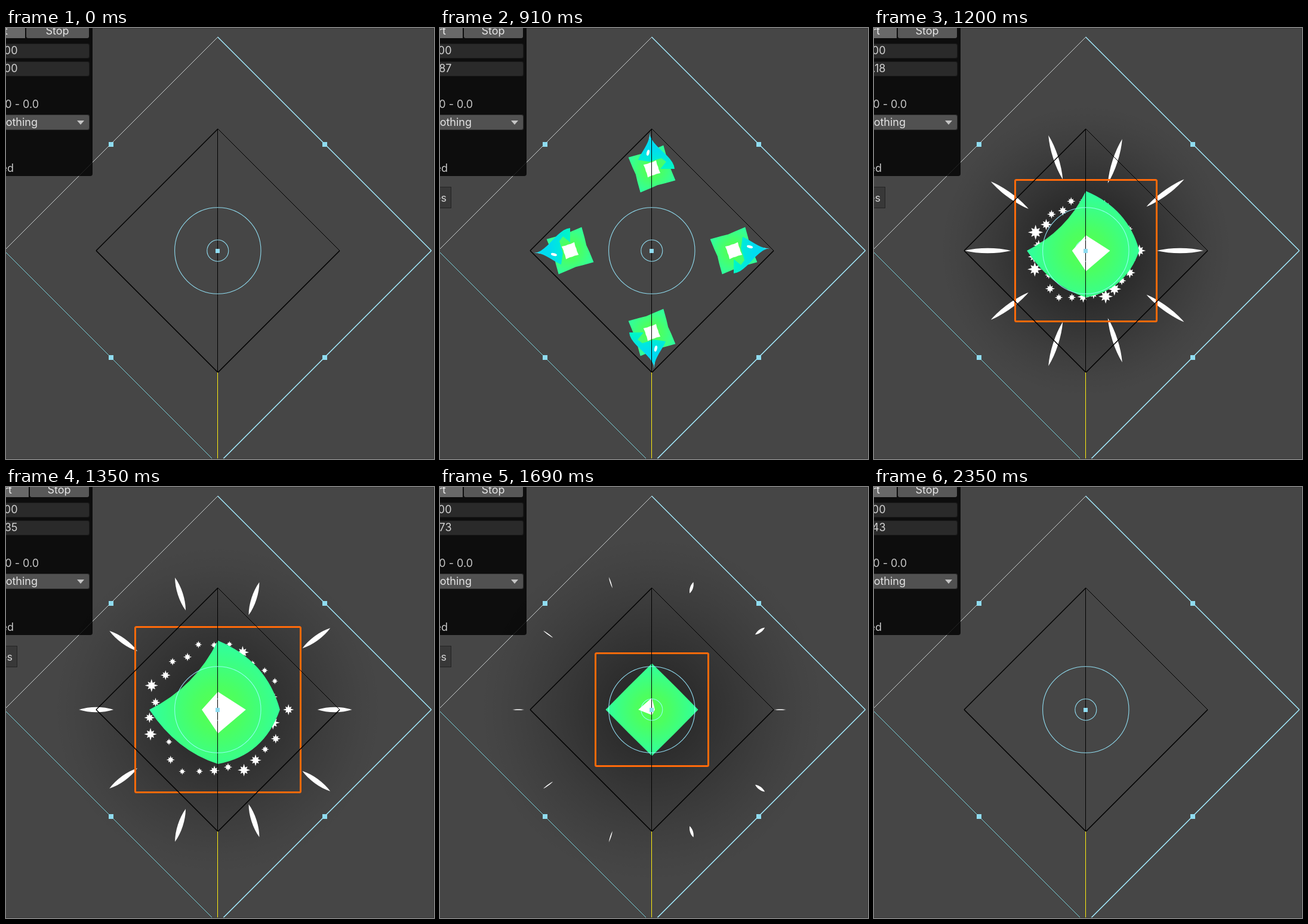
An HTML page with a canvas for the animation above (2.38 s loop, 717 by 722 pixels).

```html
<!DOCTYPE html>
<html lang="en">
<head>
<meta charset="utf-8">
<title>Particle burst</title>
<style>
html, body { margin: 0; width: 100%; height: 100%; overflow: hidden; background: #464646; }
canvas { display: block; }
</style>
</head>
<body>
<canvas id="stage" width="717" height="722"></canvas>
<script>
const ctx = document.getElementById('stage').getContext('2d');
const W = 717, H = 722, LOOP = 2380, CX = 355, CY = 373, TAU = Math.PI * 2;
const CYAN = '#8fdcf0';
const clamp = (v, a = 0, b = 1) => Math.min(b, Math.max(a, v));
const lerp = (a, b, k) => a + (b - a) * k;
const progress = (t, from, to) => clamp((t - from) / (to - from));
const random = seed => { const v = Math.sin(seed * 12.9898) * 43758.5453; return v - Math.floor(v); };
const times = (n, make) => Array.from({ length: n }, (_, i) => make(i));
const polar = (angle, r) => [Math.cos(angle) * r, Math.sin(angle) * r];

function track(keys, t) {
  const next = keys.findIndex(([time]) => t <= time);
  if (next === 0) return keys[0][1];
  if (next < 0) return keys[keys.length - 1][1];
  const [t0, v0] = keys[next - 1], [t1, v1] = keys[next];
  return lerp(v0, v1, progress(t, t0, t1));
}

function poly(points, fill) {
  ctx.beginPath();
  points.forEach(([x, y]) => ctx.lineTo(x, y));
  ctx.fillStyle = fill;
  ctx.fill();
}

function line(x1, y1, x2, y2, color, width = 1) {
  ctx.strokeStyle = color;
  ctx.lineWidth = width;
  ctx.beginPath();
  ctx.moveTo(x1, y1);
  ctx.lineTo(x2, y2);
  ctx.stroke();
}

function rect(x, y, w, h, fill, radius = 0) {
  ctx.fillStyle = fill;
  ctx.beginPath();
  ctx.roundRect(x, y, w, h, radius);
  ctx.fill();
}

function ellipse(x, y, rx, ry, angle, fill) {
  ctx.fillStyle = fill;
  ctx.beginPath();
  ctx.ellipse(x, y, rx, ry, angle, 0, TAU);
  ctx.fill();
}

function radial(radius, stops) {
  const g = ctx.createRadialGradient(0, 0, 0, 0, 0, radius);
  stops.forEach(([stop, color]) => g.addColorStop(stop, color));
  return g;
}

const green = radius => radial(radius, [[0, '#5aff4a'], [.35, '#4bff62'], [1, '#2effa2']]);

function at(x, y, angle, draw) {
  ctx.save();
  ctx.translate(x, y);
  ctx.rotate(angle);
  draw();
  ctx.restore();
}

const around = (n, draw) => times(n, i => at(CX, CY, i * TAU / n, () => draw(i)));

// Four heads fall to the centre; each tail ends where its head was a moment ago.
const headDistance = t => 204 * (1 - progress(t, 570, 1085) ** 2.7);

function square(turn, radius, quarter, middle) {
  const profile = [1.07, quarter, middle, quarter];
  return times(16, i => polar(turn + i * TAU / 16, profile[i % 4] * radius));
}

function drawTail(d, length) {
  const w = clamp(length / 60), y = s => -d - s * length, place = ([x, s]) => [x * w, y(s)];
  const taper = s => Math.cos(s * Math.PI / 2) ** 2;
  const left = times(10, i => lerp(.25, 1, i / 9)).map(s => [-26 * taper(s) - 4 * s, s]);
  const right = times(12, i => 1 - i / 11).map(s => [38 * taper(s) - 4 * s, s]);
  const notch = [[14, 0], [24, .2], [16, .3], [-4, .2]];
  const g = ctx.createLinearGradient(0, y(0), 0, y(.55));
  g.addColorStop(0, '#00f8c4');
  g.addColorStop(1, '#00dcf0');
  poly([...left, ...right, ...notch].map(place), g);

  const mark = length * .085;
  ellipse(-6.5, y(.45), 1 + mark * .25, mark, .25, '#fff');
  poly([[-2.5, y(1)], [-4, y(.86)], [-8, y(.69)], [-5, y(.82)]].map(([x, v]) => [x * w, v]), '#fff');
}

function drawHeads(t) {
  if (t < 75 || t > 1300) return;
  const d = headDistance(t), length = headDistance(t - 195) - d;
  const r = 41 * (1 - (1 - progress(t, 70, 910)) ** 2);
  const k = progress(t, 550, 910), turn = lerp(.4, .455, k);
  const alive = t < 1110;
  if (alive) around(4, () => at(0, -d, 0, () =>
    poly(square(turn, r, lerp(.88, .79, k), lerp(.83, .7, k)), green(r * 1.05))));
  if (length > 3) around(4, () => drawTail(d, length));
  if (t > 1000) around(4, () => ellipse(29, -32, 2.5, 5, -.35, '#fff'));
  if (alive) around(4, () => at(0, -d, 0, () =>
    poly(square(turn, r * lerp(.27, .36, k), .77, .74), '#fff')));
}

// Central blob: four tips joined by curves, calming into an even diamond.
const halfSize = t => t < 1030 ? 0 : 140 - .000523 * (t - 1399) ** 2;

function drawBlob(t) {
  const h = halfSize(t), k = progress(t, 1350, 1690);
  if (t < 1110 || h < 2) return;
  const mix = (wide, calm) => h * lerp(wide / 139, calm / 96, k);
  const tips = [104, 91, 115, 116].map(v => mix(v, 78));
  const sides = [109, 98, 54, 116].map(v => mix(v, 56));
  const core = [mix(47, 5), mix(40, 9), mix(27, 23), mix(30, 20)];
  at(CX, CY, 0, () => {
    ctx.fillStyle = green(h * .84);
    ctx.beginPath();
    ctx.moveTo(tips[0], 0);
    sides.forEach((side, i) => ctx.quadraticCurveTo(
      ...polar((i + .5) * TAU / 4, side), ...polar((i + 1) * TAU / 4, tips[(i + 1) % 4])));
    ctx.fill();
    poly(core.map((v, i) => polar(i * TAU / 4, v)), '#fff');
  });
}

function drawSelection(t) {
  const h = Math.round(halfSize(t)) - .5;
  if (h < 2) return;
  ctx.strokeStyle = '#ff6a0a';
  ctx.lineWidth = 3;
  ctx.beginPath();
  ctx.roundRect(CX - h, CY - h, h * 2, h * 2, 2);
  ctx.stroke();
}

function drawShadow(t) {
  if (t < 1010 || t > 2210) return;
  const size = 290 * (1 - Math.exp(-(t - 960) / 130));
  const alpha = track([[1010, .3], [1080, .74], [1350, .54], [1690, .52], [2210, 0]], t);
  const fade = times(9, i => [i / 8, `rgba(0,0,0,${alpha * (1 - i / 8) ** 1.3})`]);
  at(CX, CY, 0, () => ellipse(0, 0, size, size, 0, radial(size, fade)));
}

function drawStreaks(t) {
  if (t < 1020) return;
  const flight = 1 - Math.exp(-(t - 1010) / 147);
  const half = track([[1020, 25], [1080, 47], [1350, 29], [1690, 10], [1880, 3]], t);
  around(10, i => {
    const side = Math.min(i, 10 - i) * TAU / 10;
    const end = 1705 + 178 * Math.max(0, Math.sin(side * 5 / 3));
    if (t > end) return;
    const c = (217 + i % 2 * 9) * flight, w = 5.7 * Math.sqrt(clamp((end - t) / (end - 1350)));
    ctx.fillStyle = '#fff';
    ctx.beginPath();
    ctx.moveTo(c - half, 0);
    ctx.bezierCurveTo(c - half * .4, -w, c + half * .4, -w, c + half, 0);
    ctx.bezierCurveTo(c + half * .4, w, c - half * .4, w, c - half, 0);
    ctx.fill();
  });
}

function drawGlints(t) {
  if (t < 1110 || t > 1620) return;
  const spread = 1.1 * (1 - Math.exp(-(t - 1060) / 120));
  const scale = track([[1110, .7], [1200, 1.15], [1350, 1], [1620, 0]], t);
  around(27, i => {
    const size = scale * lerp(5, 12, random(i + 40));
    at(lerp(93, 120, random(i + 1)) * spread, 0, -i * TAU / 27, () =>
      poly(times(16, j => polar(j * TAU / 16, size * (j % 2 ? .45 : j % 4 ? .8 : 1))), '#fff'));
  });
}

function drawGizmo() {
  line(355, 15, -3, 373, '#c9cdcd');
  line(-3, 373, 355, 731, '#7cd6df');
  line(354.5, 15, 712.5, 373, '#a4ecff', 1.5);
  line(712.5, 373, 354.5, 731, '#a4ecff', 1.5);
  line(355, 169, 151, 373, '#000', 1.5);
  line(151, 373, 355, 577, '#000', 1.6);
  line(559, 373, 355, 577, '#000', 1.6);
  line(355, 169, 559, 373, '#000');
  rect(354, 169, 1, 408, '#000');
  rect(354, 577, 1, 145, '#ffee10');

  ctx.globalCompositeOperation = 'lighten';
  ctx.strokeStyle = CYAN;
  ctx.lineWidth = 1.1;
  for (const r of [72.2, 18]) {
    ctx.beginPath();
    ctx.arc(354.8, CY, r, 0, TAU);
    ctx.stroke();
  }
  ctx.globalCompositeOperation = 'source-over';

  for (const x of [172, 530]) for (const y of [191, 548]) rect(x, y, 8, 8, CYAN);
  rect(351, 370, 7, 7, CYAN);
}

function text(value, x, y, align = 'right', color = '#c8c8c8') {
  ctx.fillStyle = color;
  ctx.textAlign = align;
  ctx.fillText(value, x, y);
}

function field(value, y) {
  rect(-10, y, 150, 25, '#1c1c1c', 3);
  rect(-10, y + 1, 149, 23, '#2a2a2a', 3);
  text(value, 19.5, y + 18, 'right', '#d2d2d2');
}

function drawPanel(t) {
  const playing = t >= 70, split = playing ? 39 : 33;
  const clock = track([[118, 0], [550, .47], [1080, 1.05], [1690, 1.73], [2350, 2.43]], t);
  ctx.font = '18px Inter, Roboto, sans-serif';
  rect(-10, -10, 155, 258, 'rgba(0,0,0,.82)', 4);
  rect(-10, -10, split + 9, 27, '#696969');
  rect(split + 1, -10, 138 - split, 27, '#585858', 3);
  text(playing ? 'Restart' : 'Start', playing ? 10 : 3, 11, 'right', '#eee');
  text('Stop', (split + 139) / 2, 11, 'center', '#e6e6e6');
  field('1.00', 26);
  field((clock + 1e-6).toFixed(2), 56);
  text('0.0 - 0.0', 55, 134);
  rect(-10, 145, 150, 26, '#303030', 3);
  rect(-10, 146, 149, 24, '#515151', 3);
  text('Nothing', 53, 164, 'right', '#e4e4e4');
  poly([[119, 155], [131, 155], [125, 162]], '#c4c4c4');
  text('Selected', 13, 241);

  if (t >= 100 && t < 2130) {
    rect(-10, 266, 29, 36, '#242424');
    rect(-10, 267, 28, 34, '#383838');
    text('Particles', 11, 291, 'right', '#d2d2d2');
  }
}

function render(t) {
  rect(0, 0, W, H, '#464646');
  drawShadow(t);
  drawStreaks(t);
  drawGlints(t);
  drawHeads(t);
  drawBlob(t);
  drawSelection(t);
  drawGizmo();
  drawPanel(t);
  rect(716, 0, 1, H, '#383838');
  rect(145, 0, 572, 1, '#383838');
  rect(0, 721, W, 1, '#383838');
}

const start = performance.now();
function tick() {
  render((performance.now() - start) % LOOP);
  requestAnimationFrame(tick);
}
tick();
</script>
</body>
</html>
```
